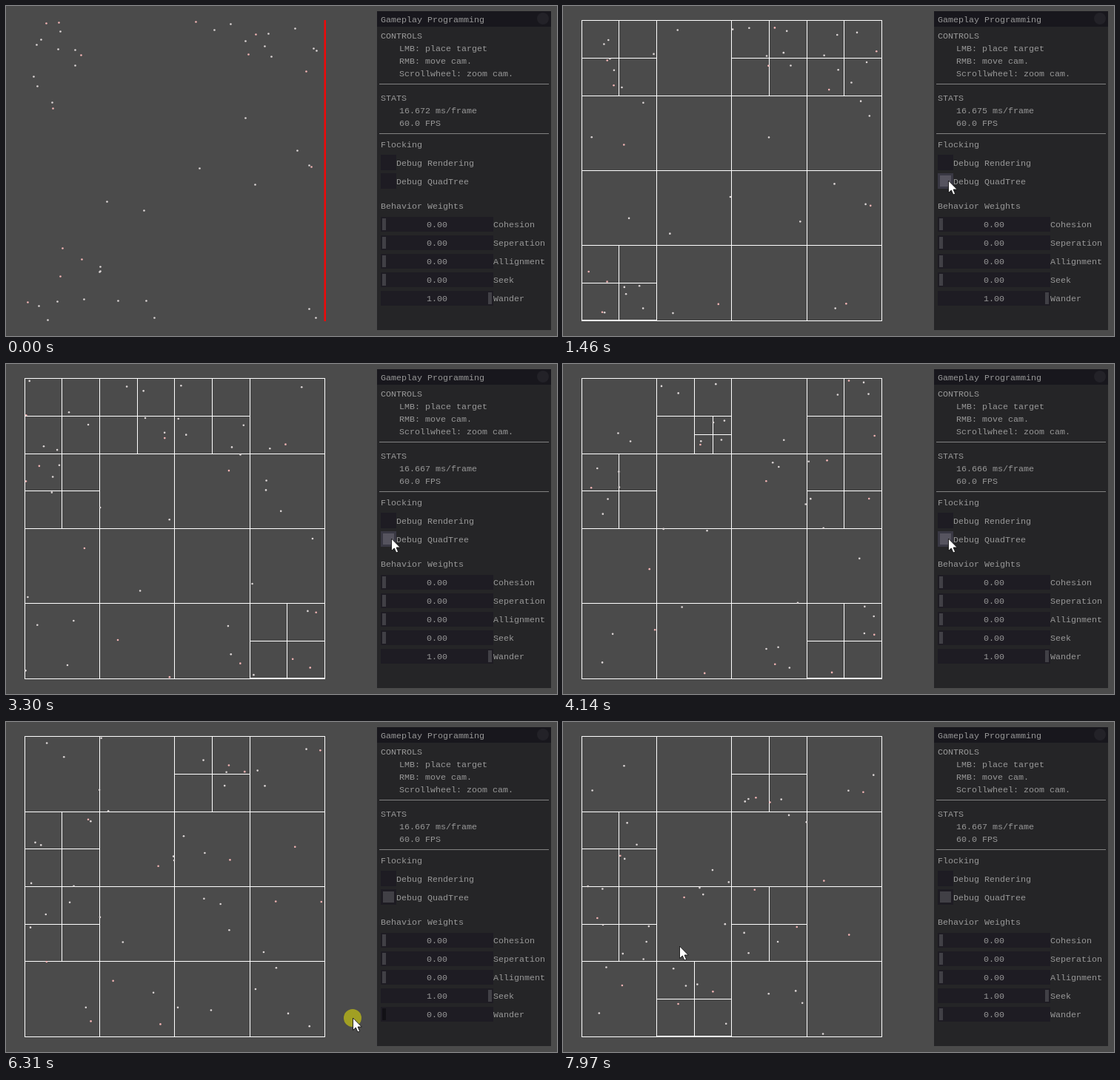
These frames come from a looping animation (744 px wide and 446 px high, 8000 ms). An HTML page with a canvas:

```html
<!DOCTYPE html>
<html>
<head>
<meta charset="utf-8">
<style>
  html, body { margin: 0; width: 100%; height: 100%; overflow: hidden; background: #4b4b4b; }
  canvas { display: block; }
</style>
</head>
<body>
<canvas id="stage" width="744" height="446"></canvas>
<script>
const ctx = document.getElementById('stage').getContext('2d');
const LOOP = 8000;
const WORLD = { x: 25.2, y: 19.8, size: 405.2 };
const SPEED = 0.03587;            // px per ms
const CELL_CAPACITY = 4;
const QUADTREE_ON = 900;
const SEEK = { start: 6310, x: 157, y: 303, strength: 0.45, ramp: 1660 };

// Start positions, ordered by heading.
const starts = [
  [70,58], [63,138], [93,80], [44,405], [56,424], [412,217], [409,215], [73,34], [69,399], [71,22],
  [93,59], [336,241], [126,359], [73,365], [62,130], [393,195], [419,60], [101,66], [42,108], [189,398],
  [261,219], [54,23], [390,30], [409,409], [37,95], [76,327], [186,276], [127,358], [47,45], [102,342],
  [415,57], [127,352], [323,151], [405,88], [136,264], [323,47], [105,396], [327,65], [358,68], [349,54],
  [303,24], [29,400], [281,32], [354,37], [200,421], [337,38], [418,421], [41,52], [151,398], [256,21]
];
// Degrees at every fourth rank, interpolated between.
const headings = [-179, 69, 87, 103, 113, 129, 134, 143, 145, 152, 163, 178, 190, 207];

function headingAt(rank) {
  const place = (rank + 3) / 4, i = Math.floor(place);
  const a = headings[i], b = headings[i + 1] ?? a;
  return (a + (b - a) * (place - i)) * Math.PI / 180;
}

const agents = starts.map(([x, y], rank) => ({ x, y, angle: headingAt(rank) }));

// time, x, y
const cursorPath = [
  [100, 606, 450], [750, 520, 236], [4300, 520, 236], [4950, 591, 372], [5450, 591, 372],
  [5650, 718, 375], [5850, 696, 378], [6000, 653, 396], [6280, 468, 400], [6550, 468, 400],
  [7400, 157, 303]
];
const checkClick = { from: 840, to: QUADTREE_ON };
const seekDrag = { from: 5420, to: 5870 };
const wanderDrag = { from: 6000, to: 6420 };
const frameTimes = [[0, 16.672], [1460, 16.675], [2510, 16.668], [4140, 16.666], [5340, 16.664], [6310, 16.667]];

const clamp = (v, lo, hi) => Math.min(hi, Math.max(lo, v));
const wrap = (v, start) => start + (((v - start) % WORLD.size) + WORLD.size) % WORLD.size;
const isPressed = (t, press) => t >= press.from && t < press.to;

function rect(x, y, w, h, color) {
  ctx.fillStyle = color;
  ctx.fillRect(x, y, w, h);
}

function disc(x, y, r, color) {
  ctx.fillStyle = color;
  ctx.beginPath();
  ctx.arc(x, y, r, 0, Math.PI * 2);
  ctx.fill();
}

function label(text, x, centerY) {
  ctx.fillStyle = '#989898';
  ctx.font = '11.67px "Liberation Mono", monospace';
  ctx.fillText(text, x, centerY + 4);
}

function sample(keys, t, ease = u => u) {
  const next = keys.findIndex(k => k[0] > t);
  if (next === 0) return keys[0].slice(1);
  if (next < 0) return keys[keys.length - 1].slice(1);
  const a = keys[next - 1], b = keys[next];
  const u = ease((t - a[0]) / (b[0] - a[0]));
  return a.slice(1).map((v, i) => v + (b[i + 1] - v) * u);
}

const cursorAt = t => sample(cursorPath, t, u => u * u * (3 - 2 * u));

function agentAt(agent, t) {
  const vx = Math.cos(agent.angle), vy = Math.sin(agent.angle);
  const straight = Math.min(t, SEEK.start) * SPEED;
  let x = wrap(agent.x + vx * straight, WORLD.x);
  let y = wrap(agent.y + vy * straight, WORLD.y);
  const seekTime = t - SEEK.start;
  if (seekTime > 0) {
    const k = SEEK.strength * Math.min(1, seekTime / SEEK.ramp);
    const dist = Math.hypot(SEEK.x - x, SEEK.y - y) || 1;
    const dx = vx * (1 - k) + (SEEK.x - x) / dist * k;
    const dy = vy * (1 - k) + (SEEK.y - y) / dist * k;
    const step = seekTime * SPEED / Math.hypot(dx, dy);
    x = wrap(x + dx * step, WORLD.x);
    y = wrap(y + dy * step, WORLD.y);
  }
  return { x, y };
}

function drawCell(points, x, y, size) {
  const left = Math.floor(x), top = Math.floor(y);
  const w = Math.floor(x + size) - left, h = Math.floor(y + size) - top;
  ctx.strokeStyle = '#fff';
  ctx.lineWidth = 1;
  ctx.strokeRect(left + 0.5, top + 0.5, w, h);
  if (points.length <= CELL_CAPACITY || size < 10) return;
  const half = size / 2;
  for (const right of [false, true]) for (const low of [false, true]) {
    const inside = points.filter(p => (p.x >= x + half) === right && (p.y >= y + half) === low);
    drawCell(inside, x + right * half, y + low * half, half);
  }
}

function drawWorld(t) {
  const points = agents.map(a => agentAt(a, t));
  if (t < QUADTREE_ON) rect(429.5, 19, 2.5, 407, '#f00808');
  else drawCell(points, WORLD.x, WORLD.y, WORLD.size);
  points.forEach((p, i) => disc(p.x + 0.5, p.y + 0.5, 1.3, i % 4 === 1 ? '#f2b4b4' : '#dcd6d6'));
}

function drawCheckbox(text, y, checked, hovered) {
  rect(506, y - 11, 21, 21, hovered ? '#393843' : '#1e1c23');
  if (checked) rect(509, y - 8, 15, 15, hovered ? '#56545f' : '#414046');
  label(text, 527, y);
}

function drawSlider(text, y, value, active) {
  rect(506, y - 10, 152, 20, '#1e1c23');
  rect(508 + 143 * value, y - 8, 5, 16, active ? '#121116' : '#414046');
  label(value.toFixed(2), 568, y);
  label(text, 658, y);
}

function sliderValue(t, drag, initial) {
  if (t < drag.from) return initial;
  const [x] = cursorAt(Math.min(t, drag.to));
  return clamp((x - 510.5) / 143, 0, 1);
}

function drawPanel(t) {
  const [mx, my] = cursorAt(t);
  rect(501, 7, 235, 431, '#252527');
  rect(501, 7, 235, 21, '#18171d');
  disc(725, 17, 8, '#232228');
  label('Gameplay Programming', 506, 18);
  label('CONTROLS', 506, 40);
  label('LMB: place target', 531, 57);
  label('RMB: move cam.', 531, 74);
  label('Scrollwheel: zoom cam.', 531, 91);
  rect(504, 105, 229, 1, '#828282');
  label('STATS', 506, 124);
  label(sample(frameTimes, t)[0].toFixed(3) + ' ms/frame', 531, 141);
  label('60.0 FPS', 531, 158);
  rect(504, 172, 229, 1, '#828282');
  label('Flocking', 506, 187);
  const hovered = mx >= 506 && mx < 632 && my >= 227 && my < 248;
  drawCheckbox('Debug Rendering', 212, false, false);
  drawCheckbox('Debug QuadTree', 237, t >= QUADTREE_ON, hovered);
  label('Behavior Weights', 506, 270);
  ['Cohesion', 'Seperation', 'Allignment'].forEach((name, i) => drawSlider(name, 295 + 25 * i, 0, false));
  drawSlider('Seek', 370, sliderValue(t, seekDrag, 0), isPressed(t, seekDrag));
  drawSlider('Wander', 395, sliderValue(t, wanderDrag, 1), isPressed(t, wanderDrag));
}

function drawCursor(t) {
  const [x, y] = cursorAt(t);
  if ([checkClick, seekDrag, wanderDrag].some(p => isPressed(t, p))) disc(x, y, 12, 'rgba(238, 234, 0, 0.53)');
  ctx.save();
  ctx.translate(x, y);
  const arrow = new Path2D('M0.5 0V16.5L4.3 13L6.9 19L9.6 17.8L7.1 12H12.3Z');
  ctx.fillStyle = '#fff';
  ctx.fill(arrow);
  ctx.strokeStyle = '#111';
  ctx.lineWidth = 0.9;
  ctx.stroke(arrow);
  ctx.restore();
}

function draw(now) {
  const t = now % LOOP;
  rect(0, 0, 744, 446, '#4b4b4b');
  drawWorld(t);
  drawPanel(t);
  drawCursor(t);
}

const startTime = performance.now();
function tick() {
  draw(performance.now() - startTime);
  requestAnimationFrame(tick);
}
tick();
</script>
</body>
</html>
```
